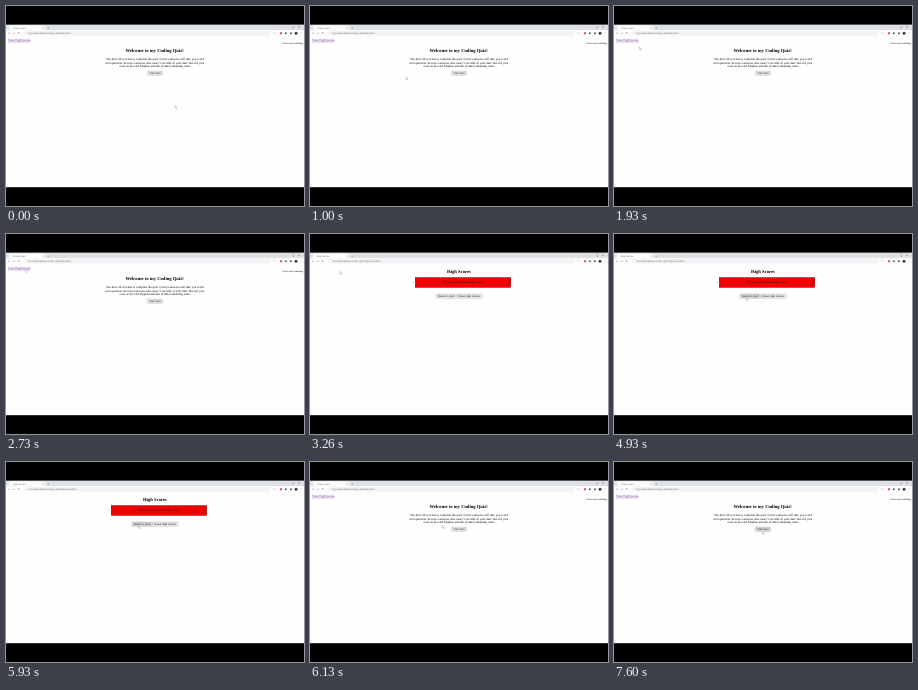
Recreate the animation shown at these times as an HTML page. Size 298 by 200 pixels, loop 8000 ms.

```html
<!DOCTYPE html>
<html lang="en">
<head>
<meta charset="utf-8">
<title>Coding Quiz</title>
<style>
  html, body { margin: 0; width: 100%; height: 100%; overflow: hidden; background: #000; }
  svg { display: block; width: 298px; height: 200px; }
  text { font: 3.1px "Liberation Serif", "Times New Roman", serif; text-rendering: geometricPrecision; }
  .mid, .button { text-anchor: middle; }
  .title { font-size: 4.65px; font-weight: bold; }
  .ui { font: 2.35px "Liberation Sans", Arial, sans-serif; fill: #666; }
  .icons { font: 2.8px "DejaVu Sans", sans-serif; fill: #555; }
  .button rect { fill: #efefef; stroke: #858585; stroke-width: .3; }
  .button.hover rect { fill: #e2e2e2; stroke: #666; }
  .button text { font: 2.58px "Liberation Sans", Arial, sans-serif; }
  #cursor { fill: #fff; stroke: #777; stroke-width: .28; stroke-linejoin: round; }
</style>
</head>
<body>
<svg viewBox="0 0 298 200">
  <!-- browser window -->
  <rect y="18.8" width="298" height="162.4" fill="#fefefe"/>
  <rect y="18.8" width="298" height="5.4" fill="#dee1e6"/>
  <rect x="3" y="19.6" width="36" height="4.6" rx="1" fill="#fff"/>
  <text id="tab" class="ui" x="7" y="22.6"></text>
  <rect x="18" y="25.1" width="247" height="4.3" rx="2.1" fill="#f1f3f4"/>
  <text id="url" class="ui" x="22" y="28.1"></text>
  <text class="icons" x="36 41.2" y="22.5">×+</text>
  <text class="icons" x="280 286 292" y="22.3">–□×</text>
  <text class="icons" x="1.8 6.6 11.4" y="28.3">←→↻</text>
  <text class="icons" x="267.3 294.3" y="28.3">☆⋮</text>
  <circle cx="275" cy="27.3" r="1.1" fill="#c0395a"/>
  <circle cx="280" cy="27.3" r="1" fill="#555"/>
  <circle cx="285" cy="27.3" r="1" fill="#555"/>
  <circle cx="290" cy="27.3" r="1.5" fill="#3c4043"/>

  <g id="quiz">
    <text x="2" y="34.8" fill="#551a8b" text-decoration="underline">View High Scores</text>
    <text x="297" y="37.8" text-anchor="end" style="font-size:2.4px">30 seconds remaining</text>
    <g class="mid">
      <text class="title" x="148.7" y="46.2">Welcome to my Coding Quiz!</text>
      <text x="149" y="54">You have 30 seconds to complete the quiz. Correct answers will take you to the</text>
      <text x="149" y="57.6">next question. Incorrect answers take away 5 seconds of your time. Record your</text>
      <text x="149" y="61.2">score at the end. Highest amount of time remaining wins!</text>
    </g>
    <g id="start" class="button">
      <rect x="141.6" y="65.2" width="14.8" height="4.1" rx=".4"/>
      <text x="149" y="68.2">Start Quiz</text>
    </g>
  </g>

  <g id="scores">
    <text class="mid title" x="149" y="38.7">High Scores</text>
    <circle cx="103" cy="48.6" r=".35" fill="#444"/>
    <rect x="105.2" y="43.6" width="95.6" height="9.8" fill="#f00000" stroke="#400" stroke-width=".4"/>
    <text class="mid" x="152.5" y="49.4" fill="#300">There are no recorded high scores</text>
    <g id="back" class="button">
      <rect x="126.2" y="60.1" width="20" height="4.1" rx=".4"/>
      <text x="136.2" y="63.1">Return to Quiz</text>
    </g>
    <g class="button">
      <rect x="146.9" y="60.1" width="24.8" height="4.1" rx=".4"/>
      <text x="159.3" y="63.1">Reset High Scores</text>
    </g>
  </g>

  <g id="cursor">
    <path id="arrow" d="M0 0V2.9L.7 2.3 1.2 3.4 1.7 3.2 1.2 2.1H2.1Z"/>
    <path id="hand" d="M.6 2V.3Q1 -.2 1.3 .3V1.3L2.7 1.7V2.8L2.2 3.5H1L0 2.1Z"/>
  </g>
</svg>
<script>
  const LOOP = 8000, FPS = 15;
  const $ = id => document.getElementById(id);
  const show = (id, on) => $(id).style.display = on ? "" : "none";

  // Straight pointer moves; each begins where the last one ended.
  const rest = { x: 168.8, y: 99.2 };
  const moves = [
    { from: 1, to: 4, x: 109.2, y: 83.6 },
    { from: 7, to: 12, x: 96, y: 70.5 },
    { from: 19, to: 22, x: 52.6, y: 54.6 },
    { from: 23, to: 29, x: 25.4, y: 40.8 },
    { from: 29, to: 34, x: 18.8, y: 35.2 },
    { from: 48, to: 58, x: 129.8, y: 55.6 },
    { from: 71, to: 74, x: 132.2, y: 63.2 },
    { from: 106, to: 112, x: 148.5, y: 69.1 }
  ];

  function pointerAt(tick) {
    let { x, y } = rest;
    for (const m of moves) {
      const k = Math.min(1, Math.max(0, (tick - m.from) / (m.to - m.from)));
      x += (m.x - x) * k;
      y += (m.y - y) * k;
    }
    return [x, y];
  }

  function draw(now) {
    const tick = Math.floor(now % LOOP * FPS / 1000 + 0.1);
    const scores = tick >= 42 && tick < 91;
    const onLink = tick >= 33 && !scores && tick < 42;

    show("quiz", !scores);
    show("scores", scores);
    $("tab").textContent = scores ? "High Scores" : "Coding Quiz";
    $("url").textContent = `corvanelm.github.io/code_quiz/${scores ? "highscores" : "index"}.html`;
    $("back").classList.toggle("hover", tick >= 73);
    $("start").classList.toggle("hover", tick >= 111);
    show("arrow", !onLink);
    show("hand", onLink);
    $("cursor").setAttribute("transform", `translate(${pointerAt(tick)})`);
    requestAnimationFrame(draw);
  }

  draw(performance.now());
</script>
</body>
</html>
```
